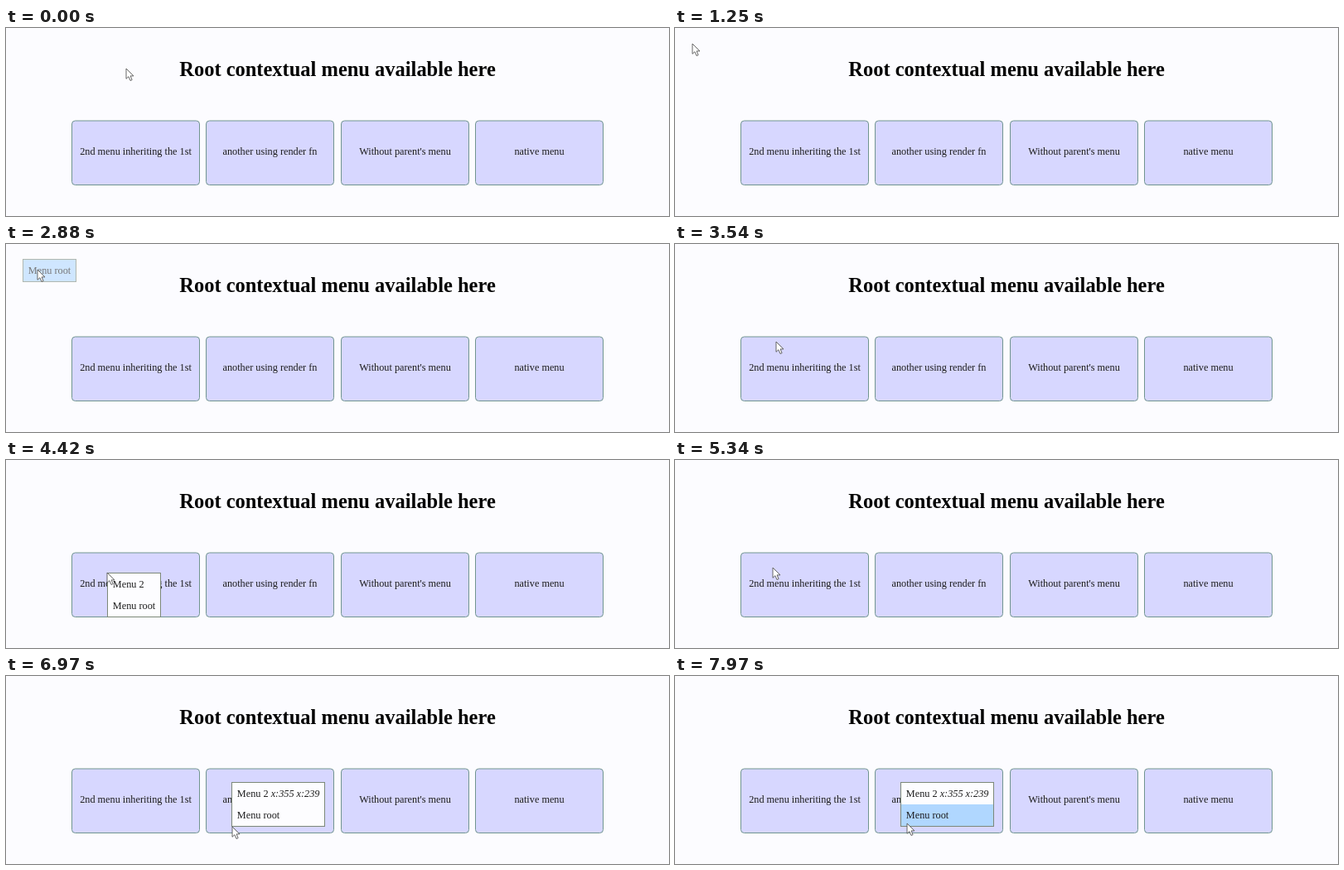
Write an HTML page that moves like this. It is 800 by 227 pixels and loops after 8000 ms.

```html
<!DOCTYPE html>
<html lang="en">
<head>
<meta charset="utf-8">
<title>Contextual menus</title>
<style>
  html, body { margin: 0; width: 100%; height: 100%; overflow: hidden; background: #fcfcff; }
  svg { display: block; width: 800px; height: 227px; font: 12.26px "Liberation Serif", "Times New Roman", serif; fill: #1c1c1c; }
  text { white-space: pre; }
  h1, .title { font-size: 24.48px; font-weight: bold; fill: #000; }
  .mid { text-anchor: middle; }
  .card { fill: #d7d7ff; stroke: #71958f; }
  .menu { fill: #fdfdff; stroke: #7c8878; }
  .hover { fill: #b0d7ff; }
  .cursor { fill: #fff; stroke: #555; stroke-width: .9; stroke-linejoin: round; }
</style>
</head>
<body>
<svg id="stage" viewBox="0 0 800 227">
  <text class="title mid" x="400" y="57.5">Root contextual menu available here</text>
</svg>
<script>
const LOOP = 8000, ROW = 26;
const stage = document.getElementById('stage');

function add(parent, tag, attrs, content = '') {
  const node = document.createElementNS('http://www.w3.org/2000/svg', tag);
  for (const key in attrs) node.setAttribute(key, attrs[key]);
  node.innerHTML = content;
  return parent.appendChild(node);
}

['2nd menu inheriting the 1st', 'another using render fn', "Without parent's menu", 'native menu']
  .forEach((label, i) => {
    const x = Math.round(79 + 162.4 * i) + .5;
    add(stage, 'rect', { class: 'card', x, y: 112, width: 154, height: 77.5, rx: 4 });
    add(stage, 'text', { class: 'mid', x: x + 77, y: 153.3 }, label);
  });

// open/close: fade start times; hover: [time, row]
const menus = [
  { x: 20, y: 18, width: 65, items: ['Menu root'], open: 1700, close: 2840, hover: [2460, 0] },
  { x: 122, y: 136, width: 65, items: ['Menu 2', 'Menu root'], open: 4150, close: 5220 },
  { x: 272, y: 128, width: 113, open: 6700, close: 9000, hover: [7830, 1],
    items: ['Menu 2 <tspan font-style="italic">x:355 x:239</tspan>', 'Menu root'] }
];

for (const menu of menus) {
  const { x, y, width, items, hover } = menu;
  menu.node = add(stage, 'g', {});
  add(menu.node, 'rect', { class: 'menu', x: x + .5, y: y + .5, width: width - 1, height: items.length * ROW + 1 });
  if (hover) menu.highlight = add(menu.node, 'rect',
    { class: 'hover', x: x + 1, y: y + 1 + hover[1] * ROW, width: width - 2, height: ROW });
  items.forEach((item, i) => add(menu.node, 'text', { x: x + 6.8, y: y + 18.3 + i * ROW }, item));
}

const cursor = add(stage, 'path', { class: 'cursor', d: 'M0 0V12.3L2.9 9.7 5 14.5 7.1 13.6 5.1 8.9H9Z' });

// [start, end, x, y] of each pointer move
const moves = [
  [0, 0, 145, 49],
  [480, 770, 29, 15],
  [1010, 1250, 21, 19],
  [2370, 2640, 38, 31],
  [2960, 3540, 122, 118],
  [3690, 3770, 122, 136],
  [4740, 4890, 118, 130],
  [5380, 6020, 268, 178],
  [6090, 6280, 273, 182],
  [7810, 7960, 280, 178]
];

const progress = (t, from, to) => Math.min(1, Math.max(0, (t - from) / (to - from || 1)));
const ease = p => p * p * (3 - 2 * p);

function draw(t) {
  let [, , x, y] = moves[0];
  for (const [from, to, nextX, nextY] of moves) {
    const p = ease(progress(t, from, to));
    x += (nextX - x) * p;
    y += (nextY - y) * p;
  }
  cursor.setAttribute('transform', `translate(${x} ${y})`);

  for (const { node, open, close, hover, highlight } of menus) {
    node.setAttribute('opacity', progress(t, open, open + 250) * (1 - progress(t, close, close + 100)));
    if (highlight) highlight.setAttribute('opacity', t >= hover[0] ? 1 : 0);
  }
}

const start = performance.now();
function tick() {
  draw((performance.now() - start) % LOOP);
  requestAnimationFrame(tick);
}
tick();
</script>
</body>
</html>
```
